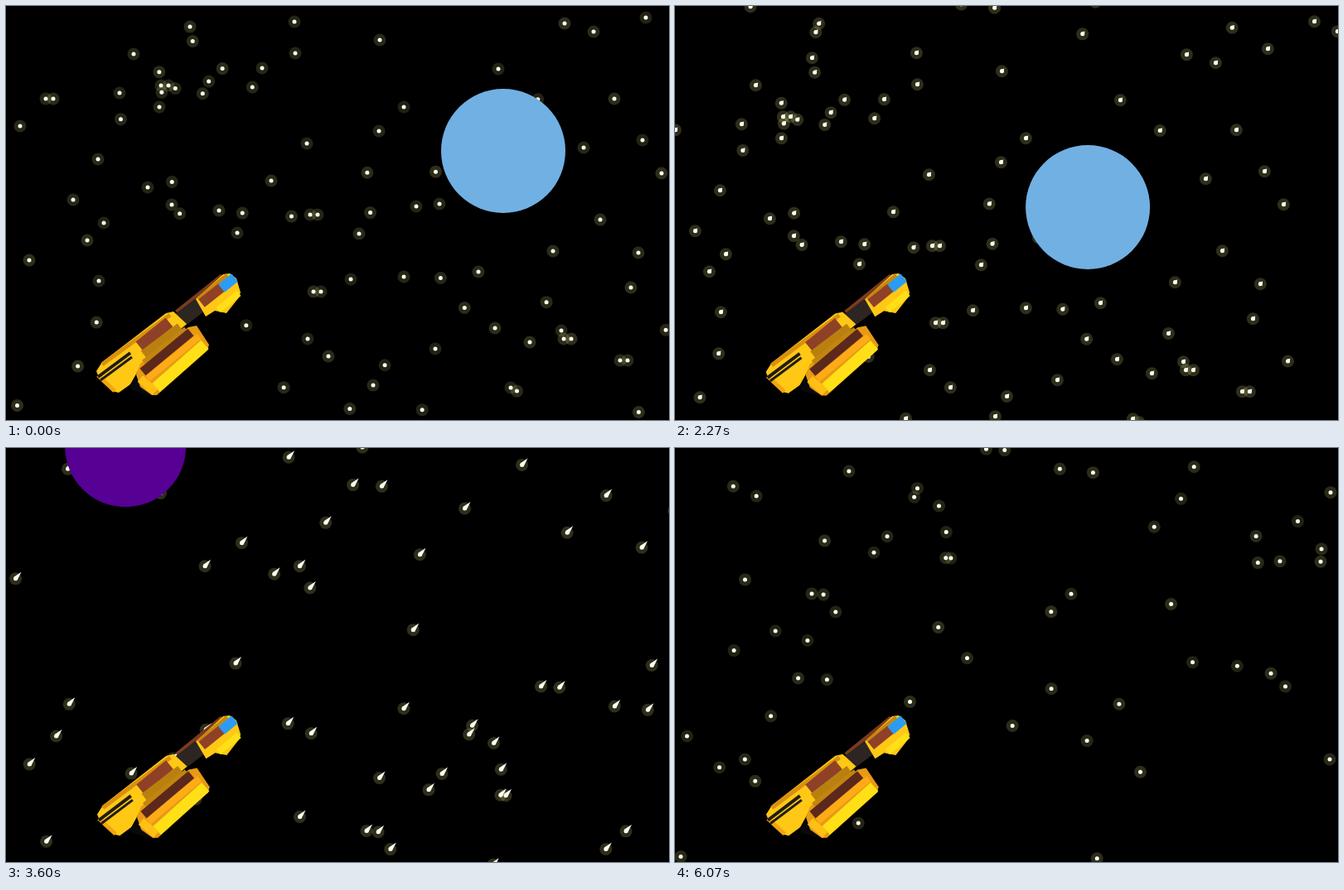
Write an HTML page with a canvas that moves like this. It is 800 by 500 pixels and loops after 6110 ms.

```html
<!DOCTYPE html>
<html lang="en">
<head>
<meta charset="utf-8">
<title>Space flight</title>
<style>
html, body { margin: 0; width: 100%; height: 100%; overflow: hidden; background: #000; }
canvas { display: block; }
</style>
</head>
<body>
<canvas id="stage" width="800" height="500"></canvas>
<script>
const ctx = document.getElementById('stage').getContext('2d');
const W = 800, H = 500, LOOP = 6110;

// Flight timing (ms) and cruising speed (px per ms along x; y moves 2/3 as far)
const START = 2000, CRUISE = 2670, BRAKE = 5200, STOP = 5700, SPEED = 1.033;
const SLOPE = 2 / 3, PARALLAX = 1.8, DOUBLES = 6;

// The first DOUBLES entries have a close companion; the rest of the sky is seeded
const departure = pairs([
  187,96, 367,252, 371,345, 673,402, 741,428, 48,112,
  772,14, 674,21, 709,31, 222,25, 348,19, 349,57, 451,41, 154,58, 309,75,
  594,76, 734,112, 137,105, 185,122, 17,145, 480,122, 450,151, 363,166,
  768,162, 697,171, 791,202, 111,185, 320,211, 171,219, 81,234, 200,240,
  257,247, 279,274, 118,262, 98,283, 495,242, 523,239, 426,275, 717,258,
  660,296, 763,298, 28,307, 112,332, 416,330, 480,327, 570,321, 754,340,
  364,402, 389,423, 443,458, 518,414, 590,389, 632,406, 609,461
]);
for (const [x, y] of departure.slice(0, DOUBLES)) departure.push([x + 9, y]);
departure.push(...scatter(32, 3));
const arrival = scatter(60, 500);

// Position at a given moment
const planets = [
  { x: 600, y: 175, r: 75, color: '#71b0e3', at: START },
  { x: 372, y: 135, r: 41, color: '#223d2d', at: 2670, bump: true },
  { x: 146, y: -3, r: 73, color: '#560094', at: 3600 },
  { x: 430, y: -15, r: 43, color: '#a3b72b', at: 4970 }
];

function pairs(list) {
  const out = [];
  for (let i = 0; i < list.length; i += 2) out.push([list[i], list[i + 1]]);
  return out;
}

function scatter(count, seed) {
  return Array.from({ length: count }, (_, i) =>
    [hash(seed + i) * W, hash(seed + i + count) * H]);
}

function hash(n) {
  const v = Math.sin(n * 12.9898 + 4.1) * 43758.5453;
  return v - Math.floor(v);
}

function mod(a, n) { return (a % n + n) % n; }

function clamp(v, lo, hi) { return Math.max(lo, Math.min(hi, v)); }

function speed(t) {
  return clamp(Math.min((t - START) / (CRUISE - START), (STOP - t) / (STOP - BRAKE)), 0, 1);
}

function distance(t) {
  const up = clamp(t - START, 0, CRUISE - START);
  const level = clamp(t - CRUISE, 0, BRAKE - CRUISE);
  const down = clamp(t - BRAKE, 0, STOP - BRAKE);
  return SPEED * (up * up / (2 * (CRUISE - START)) + level
    + down - down * down / (2 * (STOP - BRAKE)));
}

// The ship sways a little around its nose while flying
function tilt(t) {
  const rest = .009 * clamp((t - START) / 400, 0, 1);
  return rest + .008 * speed(t) * Math.sin((t - 3600) / 430);
}

function disc(x, y, r, color) {
  ctx.fillStyle = color;
  ctx.beginPath();
  ctx.arc(x, y, r, 0, 7);
  ctx.fill();
}

function poly(color, ...p) {
  ctx.fillStyle = color;
  ctx.beginPath();
  for (const [x, y] of pairs(p)) ctx.lineTo(x, y);
  ctx.fill();
}

function band(color, width, x1, y1, x2, y2) {
  ctx.strokeStyle = color;
  ctx.lineWidth = width;
  ctx.beginPath();
  ctx.moveTo(x1, y1);
  ctx.lineTo(x2, y2);
  ctx.stroke();
}

function star(x, y, id, t, v) {
  const flicker = hash(id + 97 * Math.floor(t / 700 + hash(id)));
  const alpha = v ? .18 : .13 + .05 * flicker;
  disc(x, y, 7.5, `rgba(255,255,150,${alpha})`);
  disc(x, y, 2.5, '#fffff4');
  if (v) poly('#fffff4', x - 2, y - 2, x + 7 * v, y - 8 * v, x + 2, y + 2);
}

function drawStars(t) {
  const s = distance(t), v = speed(t), left = distance(STOP) - s;
  departure.forEach(([x, y], i) => {
    if (x - s > -10) star(x - s, y + s * SLOPE, i, t, v);
  });
  if (!s) return;
  arrival.forEach(([x, y], i) => {
    const px = mod(x + left + 10, W + 20) - 10;
    const py = mod(y - left * SLOPE + 10, H + 20) - 10;
    if (py < s * SLOPE) star(px, py, i + 200, t, v);
  });
}

function drawPlanets(t) {
  for (const p of planets) {
    const d = (distance(t) - distance(p.at)) * PARALLAX;
    const x = p.x - d, y = p.y + d * SLOPE;
    disc(x, y, p.r, p.color);
    if (p.bump) disc(x + 16, y - 16, 25, p.color);
  }
}

function drawShip(angle) {
  ctx.save();
  ctx.translate(275, 330);
  ctx.rotate(-angle);
  ctx.translate(-275, -330);

  // Neck
  band('#7d3b1d', 6, 206, 370, 261, 326);
  band('#2c2522', 19, 209, 380, 234, 361);

  // Nose pod
  poly('#ffc815', 229, 354, 262, 324, 270, 323, 278, 329, 283, 346,
    281, 352, 266, 371, 252, 368, 241, 375);
  band('#c98710', 5, 232, 354, 267, 325);
  band('#8f4127', 12, 236, 359, 260, 340);
  band('#2a9cf5', 12, 260, 341, 276, 328);
  band('#ffe017', 8, 256, 367, 281, 347);

  // Rear hull
  poly('#ffc815', 109, 441, 116, 430, 193, 371, 202, 369, 218, 384,
    165, 430, 150, 457, 136, 467, 128, 465, 113, 451);
  band('#d99010', 5, 116, 433, 198, 373);
  band('#8f4127', 14, 161, 411, 197, 382);
  band('#b9800f', 14, 167, 422, 211, 389);
  band('#f2a512', 5, 111, 446, 131, 465);
  band('#211c16', 4, 111, 448, 150, 419);
  band('#211c16', 3, 114, 452, 152, 424);

  // Engine
  poly('#090909', 149, 458, 157, 449, 174, 470, 152, 464);
  poly('#e89a13', 157, 445, 162, 432, 220, 388, 230, 386, 245, 409,
    243, 416, 182, 470, 176, 470, 162, 460);
  band('#c2850f', 6, 166, 430, 217, 390);
  band('#5c281c', 11, 165, 442, 223, 394);
  band('#ffab17', 8, 171, 450, 233, 399);
  band('#ffe016', 14, 181, 461, 240, 409);
  band('#ffc016', 10, 162, 450, 180, 466);
  ctx.restore();
}

function frame(now) {
  const t = now % LOOP;
  ctx.fillStyle = '#000';
  ctx.fillRect(0, 0, W, H);
  drawStars(t);
  drawPlanets(t);
  drawShip(tilt(t));
  requestAnimationFrame(frame);
}

requestAnimationFrame(frame);
</script>
</body>
</html>
```
